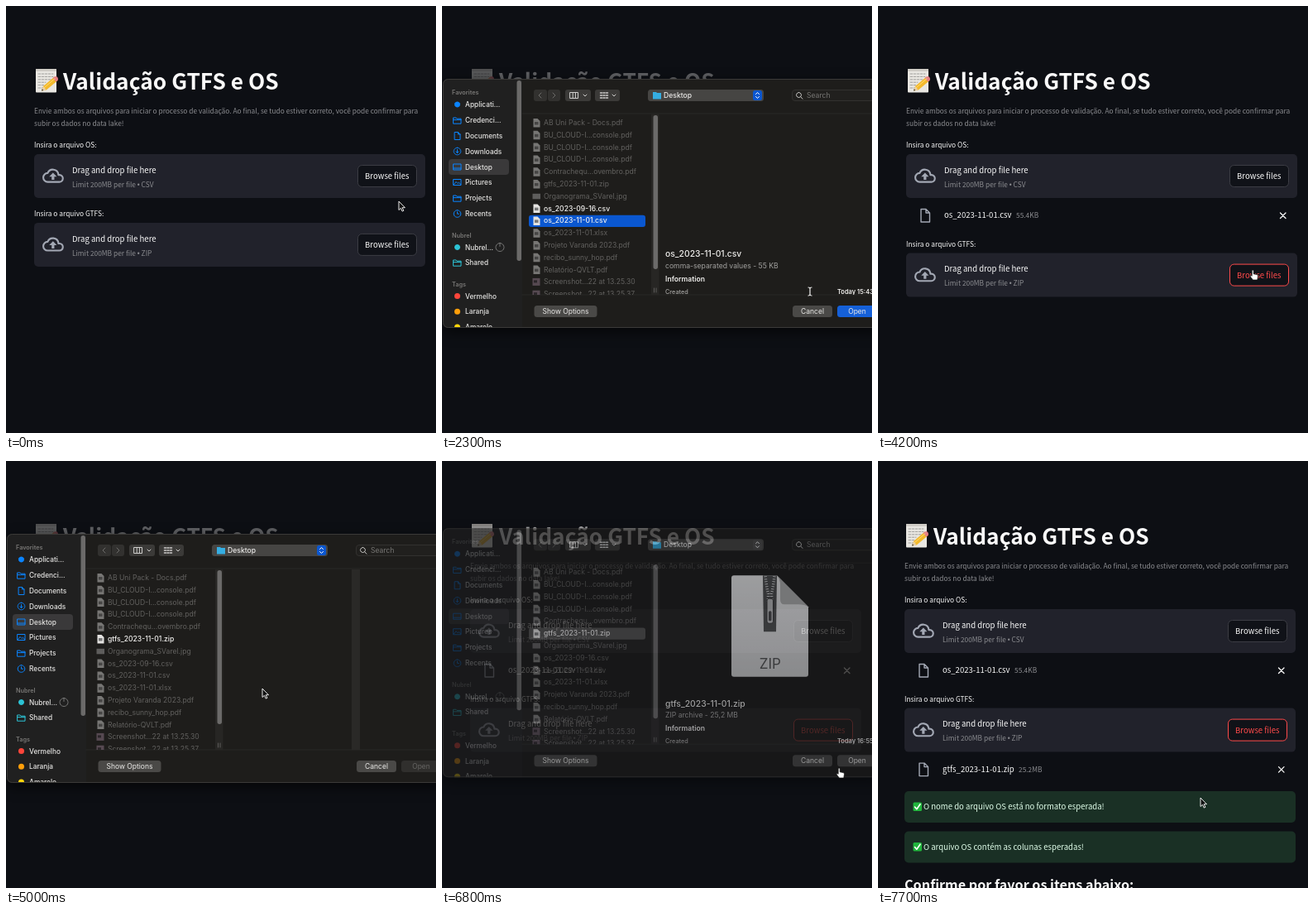
Animation, 520 px wide and 516 px high, one loop 8 s. Source, as an HTML page:

```html
<!DOCTYPE html>
<html lang="pt">
<head>
<meta charset="utf-8">
<title>Validação GTFS e OS</title>
<style>
  html, body { margin: 0; height: 100%; overflow: hidden; background: #0d0f14; }
  svg { display: block; width: 520px; height: 516px; }
  text { white-space: pre; }
  .page { font-family: "Noto Sans CJK JP", "Noto Sans CJK SC", "Noto Sans CJK KR", sans-serif; }
  .dialog { font-family: Inter, "Liberation Sans", sans-serif; }
  .bullet { font-family: "Liberation Sans", sans-serif; }
  .shadow { filter: drop-shadow(0 5px 8px #0009); }
</style>
</head>
<body>
<svg id="stage" viewBox="0 0 520 516"></svg>
<script>
const LOOP = 8000, STEP = 100, REOPEN = 3700;
const SMALL = 8.37, BODY = 9.57, WHITE = '#fafafa', MUTED = '#8b8c90', RED = '#ff4b4b';

const clamp = v => Math.max(0, Math.min(1, v));
const smooth = v => { v = clamp(v); return v * v * (3 - 2 * v); };

const text = (x, y, size, fill, str, extra = '') =>
  `<text x="${x}" y="${y}" font-size="${size}" fill="${fill}" ${extra}>${str}</text>`;
const rect = (x, y, w, h, fill, r = 0, extra = '') =>
  `<rect x="${x}" y="${y}" width="${w}" height="${h}" rx="${r}" fill="${fill}" ${extra}/>`;
const line = (d, stroke, width = 1, extra = '') =>
  `<path d="${d}" fill="none" stroke="${stroke}" stroke-width="${width}" stroke-linecap="round" stroke-linejoin="round" ${extra}/>`;
const shape = (d, fill, extra = '') => `<path d="${d}" fill="${fill}" ${extra}/>`;
const group = (x, y, body, extra = '') => `<g transform="translate(${x} ${y})" ${extra}>${body}</g>`;
const middle = 'text-anchor="middle"', medium = 'font-weight="500"', semibold = 'font-weight="600"', bold = 'font-weight="700"';

/* ---------- web page ---------- */

const memo = rect(36, 76, 25, 28.5, '#e9e7e2', 1) + rect(36, 76, 25, 3, '#cfccc6', 1) +
  [0, 1, 2, 3, 4, 5].map(i =>
    line(`M39 ${82 + i * 3.4}h${i < 3 ? 18 : 12 - i}`, '#8f8d8b', .8, 'stroke-dasharray="2.6 1.5"')).join('') +
  shape('M43 102.5l2-5.5 13.5-11.5 4 4.4-13.7 11.6z', '#f3b92c') +
  shape('M43 102.5l2-5.5 3.8 4.5z', '#e8cfa6') + shape('M43 102.5l.8-2.2 1.5 1.6z', '#333') +
  shape('M56.5 87.2l2-1.7q3-1.5 4.2 1.2 .8 2-.2 3.2l-2 1.7z', '#e57f86') +
  line('M46.5 98.5l12.5-10.7', '#ffdc70');

const cloud = '<g transform="translate(44 192.3) scale(1.07)">' +
  line('M6 19h13a4 4 0 0 0 .3-8h-1.2v-.5A6.3 6.3 0 0 0 6 9 5 5 0 0 0 6 19z', '#a3a8b4', 2) +
  shape('M12 8.5l4.3 4.5h-2.8v3.6h-3V13H7.7z', '#a3a8b4') + '</g>';

function dropZone(y, label, type, active) {
  return group(0, y,
    text(34, 171, SMALL, WHITE, label) +
    rect(34, 179, 473, 53, '#21222b', 5) + cloud +
    text(80, 201.7, BODY, WHITE, 'Drag and drop file here') +
    text(80, 218.7, SMALL, MUTED, `Limit 200MB per file <tspan class="bullet">•</tspan> ${type}`) +
    rect(425.5, 192.5, 71, 26, '#101218', 5, `stroke="${active ? RED : '#3c3d44'}"`) +
    text(460.8, 209, BODY, active ? RED : WHITE, 'Browse files', middle));
}

const fileRow = (y, name, size, sizeX) => group(0, y,
  line('M52 245.5h6l4.5 4.5v11h-10.5zM58 245.5v4.5h4.5', '#a3a8b4', 1.4) +
  text(80, 256.3, BODY, WHITE, name) + text(sizeX, 256.3, SMALL, MUTED, size) +
  line('M486.5 250l6.5 6.5m0-6.5l-6.5 6.5', WHITE, 1.3));

const success = (y, str) =>
  rect(34, y, 473, 38, '#1a3025', 5) + rect(44.5, y + 13.5, 10.5, 10.5, '#20b53c', 1.5) +
  line(`M46.5 ${y + 19}l2.3 2.7 4.2-6`, '#fff', 1.6) +
  text(57, y + 22.3, BODY, '#dffde9', str);

function page(t) {
  const uploaded = t >= 3500, done = t >= 7400;
  const lower = uploaded ? 119.6 : 82.9;
  return group(done ? -2 : 0, 0,
    memo +
    text(69, 101, 26.3, WHITE, 'Validação GTFS e OS', bold) +
    text(34, 130, SMALL, MUTED, 'Envie ambos os arquivos para iniciar o processo de validação. Ao final, se tudo estiver correto, você pode confirmar para') +
    text(34, 144.7, SMALL, MUTED, 'subir os dados no data lake!') +
    dropZone(0, 'Insira o arquivo OS:', 'CSV', t >= 300 && t < 4200) +
    (uploaded ? fileRow(0, 'os_2023-11-01.csv', '55.4KB', 167) : '') +
    dropZone(lower, 'Insira o arquivo GTFS:', 'ZIP', t >= 3800) +
    (t >= 7200 ? fileRow(lower, 'gtfs_2023-11-01.zip', '25.2MB', 172) : '') +
    (done ? success(399, 'O nome do arquivo OS está no formato esperada!') +
      success(447.5, 'O arquivo OS contém as colunas esperadas!') +
      text(34, 518, 16.2, WHITE, 'Confirme por favor os itens abaixo:', bold) : ''),
    'class="page"');
}

/* ---------- file dialog ---------- */

const ICONS = {
  folder: 'M.5 2h3l1 1.2h5v6h-9zM.5 4.6h9',
  page: 'M2 .5h4l2.5 2.5v6.5h-6.5zM6 .5v2.5h2.5',
  down: 'M5 .7a4.3 4.3 0 1 0 .01 0M5 3v4M3.3 5.4l1.7 1.7 1.7-1.7',
  desk: 'M.5 1.5h9v7h-9zM.5 6.5h9',
  image: 'M.5 1.5h9v7h-9zM1 7.5l2.5-3 2 2 1.5-1.2 2 2.2',
  clock: 'M5 .7a4.3 4.3 0 1 0 .01 0M5 2.8v2.4h2',
  disc: 'M5 1.5a3.5 3.5 0 1 0 .01 0'
};
const SIDEBAR = [
  ['Applicati...', 'disc', 119], ['Credenci...', 'folder', 138], ['Documents', 'page', 157],
  ['Downloads', 'down', 175.5], ['Desktop', 'desk', 194.5], ['Pictures', 'image', 213],
  ['Projects', 'folder', 232], ['Recents', 'clock', 251],
  ['Nubrel...', 'disc', 291.5], ['Shared', 'folder', 310]
];
const TAGS = [['Vermelho', '#ff453a'], ['Laranja', '#ff9f0a'], ['Amarelo', '#ffd60a']];
const FILES = [
  'AB Uni Pack - Docs.pdf', 'BU_CLOUD-I...console.pdf', 'BU_CLOUD-I...console.pdf',
  'BU_CLOUD-I...console.pdf', 'Contrachequ...ovembro.pdf', 'gtfs_2023-11-01.zip',
  'Organograma_SVarel.jpg', 'os_2023-09-16.csv', 'os_2023-11-01.csv', 'os_2023-11-01.xlsx',
  'Projeto Varanda 2023.pdf', 'recibo_sunny_hop.pdf', 'Relatório-QVLT.pdf',
  'Screenshot...22 at 13.25.30', 'Screenshot...22 at 13.25.37'
];

const heading = (str, y) => text(12, y + 2.7, 7.3, '#787775', str, semibold);
const label = (str, y) => text(28, y + 3, 8.3, '#e6e5e3', str, medium);
const button = (x, w, str, fill, color = '#ebeae8') =>
  rect(x, 362, w, 14, fill, 3.5) + text(x + w / 2, 372, 8.5, color, str, middle);

const sidebarItems =
  rect(8, 185, 73, 19, '#3a393a', 4) +
  heading('Favorites', 104) + heading('Nubrel', 277) + heading('Tags', 336) +
  SIDEBAR.map(([name, icon, y]) => {
    const color = y > 280 ? '#2cc3d5' : '#0a84ff';
    return group(13.5, y - 5, icon === 'disc' ? shape(ICONS.disc, color) : line(ICONS[icon], color)) +
      label(name, y);
  }).join('') +
  line('M70 286.5a5 5 0 1 0 .01 0M70 286.5v4', '#8a8988', .8) +
  TAGS.map(([name, color], i) => {
    const y = 350.5 + i * 18.8;
    return `<circle cx="18.5" cy="${y}" r="3.5" fill="${color}"/>` + label(name, y);
  }).join('');

const sidebar = opacity => rect(1, 88, 96, 301, '#202020') +
  `<g opacity="${opacity}">${sidebarItems}</g>` + rect(90.5, 90, 5.5, 218, '#6b6a69', 2.7);

function toolbar(accent) {
  return rect(111, 101, 16, 14, '#32312f', 3) + rect(128, 101, 15, 14, '#32312f', 3) +
    line('M120 105l-3 3 3 3M134 105l3 3-3 3', '#6d6c6a') +
    rect(149, 101, 31, 14, '#3b3a38', 3) + rect(185, 101, 30, 14, '#3b3a38', 3) +
    line('M155 104.5h9.5v7h-9.5zM158.2 104.5v7M161.4 104.5v7M171 107l2 2 2-2M206 107l2 2 2-2', '#d0cfcd') +
    [105, 108, 111].map(y => line(`M191.5 ${y}h2m1.5 0h2m1.5 0h2`, '#d0cfcd', 1.5)).join('') +
    rect(249, 101, 140, 14, '#464543', 3.5) + shape('M255 104h4l1 1h5v7.5h-10z', '#35aee2') +
    text(268, 111.2, 8.6, '#ebeae8', 'Desktop', medium) +
    rect(376, 102, 11, 12, accent, 2.5) + line('M379.5 106.5l2-2 2 2M379.5 109.5l2 2 2-2', '#fff') +
    rect(423.5, 101.5, 120, 13, '#21201e', 3.5, 'stroke="#32312f"') +
    line('M431.5 104.5a3 3 0 1 0 .01 0M433.7 109.7l2.3 2.5', '#c5c4c2') +
    text(441, 111.2, 8.6, '#777674', 'Search');
}

function fileIcon(name, y) {
  if (name.endsWith('jpg')) return rect(109.5, y - 3, 9.5, 6.5, '#aaa');
  if (name.startsWith('Screen')) return rect(109.5, y - 4.5, 9, 9, '#9a7f94') + rect(111, y - 2, 4, 3, '#392f38');
  return shape(`M110.5 ${y - 5}h5l3 3v7.5h-8z`, '#e4e3e1') + rect(112, y - 1, 4.5, 3.5, '#777');
}

function fileList(extension, picked, selection) {
  return FILES.map((name, i) => {
    const y = 141 + i * 14.8, enabled = name.endsWith(extension);
    return (name === picked ? rect(105, y - 6.7, 141, 14.3, selection, 3) : '') +
      `<g opacity="${enabled ? 1 : .45}">${fileIcon(name, y)}</g>` +
      text(123, y + 3, 8.6, enabled ? '#f2f1ef' : '#62615f', name, enabled ? medium : '');
  }).join('');
}

const csvIcon = shape('M336 146h89l35 35v78q0 3-3 3H336q-3 0-3-3V149q0-3 3-3z', 'url(#paper)') +
  shape('M425 146l35 35h-32q-3 0-3-3z', '#a9a9a9') +
  [0, 1, 2, 3, 4, 5].map(i => line(`M341 ${189 + i * 7}h110`, '#b4b4b4', 1, 'stroke-dasharray="9 3"')).join('') +
  text(396.5, 251, 13, '#6c6c6c', 'CSV', middle);

const zipIcon = shape('M353 145h52l38 38v81.5q0 3-3 3H353q-3 0-3-3V148q0-3 3-3z', 'url(#paper)') +
  shape('M405 145l38 38q-4-3-12-3h-17q-5 0-5-6v-17q0-8-4-12z', '#b2b2b2') +
  shape('M388 145h17l-1 68h-15z', '#4c4c4c') +
  line('M391 146q2 16 3.5 21v12M402 146q-2 16-3.5 21v12', '#d2d2d2', 3.5, 'stroke-dasharray="1 2" style="stroke-linecap:butt"') +
  rect(393, 173, 7.5, 30, '#bcbcbc', 2.5, 'stroke="#333"') + rect(395, 188, 3.5, 12, '#444', 1.5) +
  text(396.8, 257.3, 17, '#555', 'ZIP', middle);

const preview = (icon, name, kind, time) => icon +
  text(270, 303.4, 10.35, '#f0efed', name, medium) +
  text(270, 316.6, 8.63, '#a3a2a0', kind) +
  text(270, 332.6, 8.6, '#f0efed', 'Information', semibold) +
  text(270, 347.6, 7.3, '#a3a2a0', 'Created', medium) +
  text(478, 347.6, 7.5, '#f0efed', `Today ${time}`, semibold);

function dialog(t) {
  const first = t < 4000, u = first ? t : t - REOPEN;
  const closing = clamp((u - 3000) / 400);
  const alpha = clamp((u - 750) / 400) * (1 - closing) ** 1.6;
  if (!alpha) return '';
  const shift = -26 * (1 - smooth((u - 900) / 400)) - 27 * closing;
  const selectedAt = first ? 2200 : 5800, selected = t >= selectedAt;
  const iconReady = t >= selectedAt + 300;
  const accent = closing ? '#4f4e4c' : '#0a57d0';
  const file = first ? 'os_2023-11-01.csv' : 'gtfs_2023-11-01.zip';
  const details = first
    ? preview(iconReady ? csvIcon : '', file, 'comma-separated values - 55 KB', '15:43')
    : preview(iconReady ? zipIcon : '', file, 'ZIP archive - 25,2 MB', '16:55');
  return rect(0, 0, 520, 516, '#0e1014', 0, `opacity="${.66 * alpha ** 1.3}"`) +
    group(0, shift,
      rect(1, 88, 530, 301, '#1e1d1b', 6, 'class="shadow"') +
      '<g clip-path="url(#window)">' +
      sidebar((1 - closing) ** 3) + toolbar(accent) +
      line('M97 130h423M97 349h423', '#292826') +
      '<g clip-path="url(#files)">' +
      rect(253, 130, 9.5, 219, '#272624') + rect(255.5, 132, 5.5, 186, '#6b6a69', 2.7) +
      line('M256.5 341v5M259 341v5', '#6b6a69', .8) +
      fileList(first ? 'csv' : 'zip', selected && file, accent) +
      (selected ? details : rect(418, 130, 10, 219, '#2a2927')) + '</g>' +
      button(111.5, 76, 'Show Options', '#4a4947') + button(424, 48, 'Cancel', '#4a4947') +
      (selected ? button(478, 48, 'Open', closing ? '#4a4947' : '#1560d8')
        : button(478, 48, 'Open', '#302f2d', '#666563')) +
      '</g>' + rect(1.5, 88.5, 530, 300, 'none', 6, 'stroke="#3b3a38"'),
      `class="dialog" opacity="${alpha}"`);
}

/* ---------- pointer ---------- */

const POINTERS = {
  arrow: shape('M0 0v10.5l2.5-2.2 1.7 3.8 1.7-.8-1.7-3.6h3.3z', '#111', 'stroke="#fff" stroke-width=".9"'),
  hand: shape('M3.2 0a1 1 0 0 1 1 1v3.8l4 .8q1.5.4 1.3 2L8.8 12H3.4L.3 8q-.6-1.3.6-1.5l1.3.8V1a1 1 0 0 1 1-1z', '#fff', 'stroke="#111" stroke-width=".7"'),
  beam: line('M-2-5q2 0 2 1.5 0-1.5 2-1.5M0-4v8M-2 5q2 0 2-1.5 0 1.5 2 1.5', '#eee', 1.2)
};
const TRACK = [
  [0, 475, 236, 'arrow'], [100, 469, 216, 'arrow'], [200, 469, 216, 'arrow'], [300, 466, 208, 'hand'],
  [700, 466, 208, 'hand'], [1000, 310, 257, 'arrow'], [1500, 310, 257, 'arrow'], [2000, 200, 258, 'arrow'],
  [2200, 200, 258, 'arrow'], [2300, 445, 345, 'beam'], [2600, 477, 371, 'arrow'], [3000, 477, 371, 'hand'],
  [3300, 474, 316, 'hand'], [3900, 452, 322, 'hand'], [4000, 450, 319, 'hand'], [4400, 450, 319, 'hand'],
  [4700, 310, 275, 'arrow'], [5000, 310, 275, 'arrow'], [5200, 229, 248, 'arrow'], [5600, 195, 213, 'arrow'],
  [5800, 195, 213, 'arrow'], [6300, 477, 371, 'arrow'], [6700, 477, 371, 'hand'], [7100, 477, 371, 'hand'],
  [7500, 390, 407, 'arrow'], [LOOP, 390, 407, 'arrow']
];

function pointer(t) {
  const i = TRACK.findIndex(key => key[0] > t);
  const [t0, x0, y0, kind] = TRACK[i - 1], [t1, x1, y1] = TRACK[i];
  const k = smooth((t - t0) / (t1 - t0));
  return group(x0 + (x1 - x0) * k, y0 + (y1 - y0) * k, POINTERS[kind]);
}

/* ---------- loop ---------- */

const defs = `<defs>
  <clipPath id="window">${rect(1, 88, 530, 301, '#000', 6)}</clipPath>
  <clipPath id="files">${rect(98, 131, 422, 218, '#000')}</clipPath>
  <linearGradient id="paper" x2="0" y2="1"><stop stop-color="#f0f0f0"/><stop offset="1" stop-color="#d2d2d2"/></linearGradient>
</defs>`;
const stage = document.getElementById('stage');
let shown = -1;

function tick() {
  const t = Math.floor(performance.now() % LOOP / STEP) * STEP;
  if (t !== shown) {
    stage.innerHTML = defs + page(t) + dialog(t) + pointer(t);
    shown = t;
  }
  requestAnimationFrame(tick);
}
tick();
</script>
</body>
</html>
```
